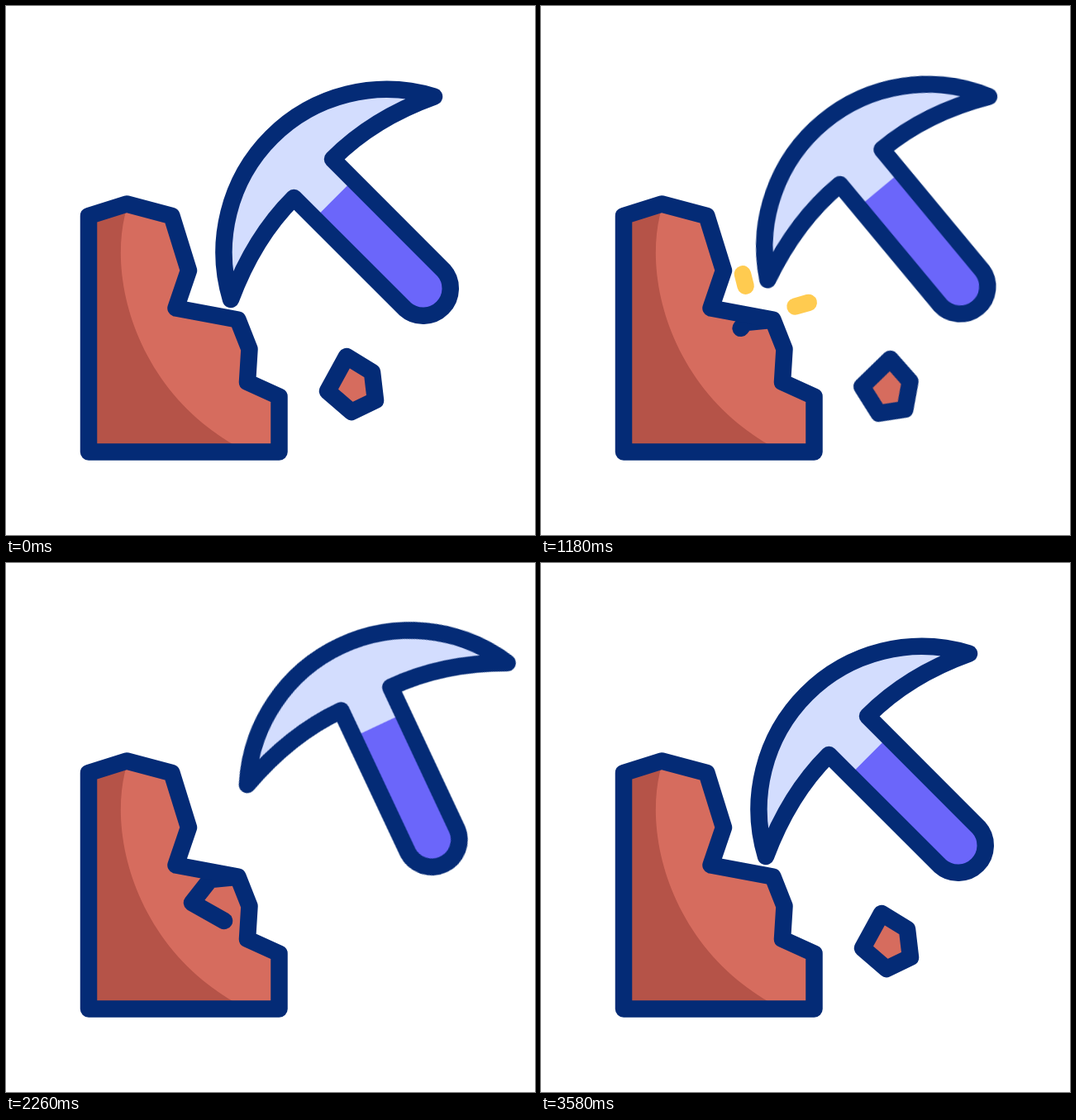
Write an HTML page that moves like this. It is 640 px wide and 640 px high and loops after 3.6 s.

```html
<!DOCTYPE html>
<html lang="en">
<head>
<meta charset="utf-8">
<title>Mining</title>
<style>
  html, body { margin: 0; width: 100%; height: 100%; overflow: hidden; background: #fff; }
  svg { display: block; width: 100vw; height: 100vh; overflow: hidden; }
  .line { fill: none; stroke: #042b76; stroke-width: 20.5; stroke-linecap: round; stroke-linejoin: round; }
  .rock { fill: #d66c5e; }
  .shade { fill: #b55348; }
  .steel { fill: #d3ddfe; }
  .grip { fill: #6b66fa; }

  #pick, #crack, #sparks, #sparks path, #flyX, #flyY, #spin { animation: 3600ms linear infinite; }

  /* three swings, 800 ms each */
  #pick { transform-origin: 530px 368.5px; animation-name: swing; }
  @keyframes swing {
    0% { transform: rotate(0deg); }
    5.556%, 27.778%, 50% { transform: rotate(0deg); animation-timing-function: cubic-bezier(.5, -.22, .6, 1); }
    16.667%, 38.889%, 61.111% { transform: rotate(20.6deg); animation-timing-function: cubic-bezier(.5, 0, .44, 1); }
    72.222%, 100% { transform: rotate(0deg); }
  }

  #crack { stroke-dasharray: 111 300; animation-name: split, showCrack; }
  @keyframes split {
    0%, 27.778% { stroke-dashoffset: 111; }
    35%, 50% { stroke-dashoffset: 54; }
    57.5%, 100% { stroke-dashoffset: 0; }
  }
  @keyframes showCrack {
    0% { opacity: 0; animation-timing-function: step-end; }
    27.778% { opacity: 1; animation-timing-function: step-end; }
    72.222%, 100% { opacity: 0; }
  }

  #sparks { fill: none; stroke: #ffcb50; stroke-width: 20.5; stroke-linecap: round; animation-name: flash; animation-timing-function: step-end; }
  #sparks path { animation-name: shoot; }
  @keyframes flash {
    0%, 40.278%, 62.5%, 84.722%, 100% { opacity: 0; }
    27.778%, 50%, 72.222% { opacity: 1; }
  }
  @keyframes shoot {
    0%, 27.778%, 50%, 72.222% { stroke-dasharray: 0 300; stroke-dashoffset: 0; }
    30.556%, 52.778%, 75% { stroke-dasharray: 34 300; stroke-dashoffset: 0; }
    36.111%, 58.333%, 80.556% { stroke-dasharray: 41 300; stroke-dashoffset: -59; }
    40%, 62.222%, 84.444%, 100% { stroke-dasharray: 0 300; stroke-dashoffset: -100; }
  }

  /* the loose stone drops away, then a new one breaks off */
  #flyX { animation-name: flyX; }
  #flyY { animation-name: flyY; }
  #spin { animation-name: spin; }
  @keyframes flyX {
    0%, 27.778% { transform: translateX(419px); }
    47.778%, 72.221% { transform: translateX(421px); }
    72.222% { transform: translateX(259px); animation-timing-function: cubic-bezier(.33, .09, .67, .53); }
    94.444%, 100% { transform: translateX(419px); }
  }
  @keyframes flyY {
    0% { transform: translateY(457px); }
    27.778% { transform: translateY(457px); animation-timing-function: cubic-bezier(.33, 0, .67, 0); }
    47.778%, 72.221% { transform: translateY(682px); }
    72.222% { transform: translateY(405px); animation-timing-function: cubic-bezier(.33, .6, .67, 1); }
    84.444% { transform: translateY(350px); animation-timing-function: cubic-bezier(.33, 0, .67, .4); }
    94.444%, 100% { transform: translateY(457px); }
  }
  @keyframes spin {
    0% { transform: rotate(0deg); }
    27.778% { transform: rotate(0deg); animation-timing-function: cubic-bezier(.33, 0, .67, .33); }
    47.778%, 72.221% { transform: rotate(270deg); }
    72.222% { transform: rotate(-90deg); animation-timing-function: cubic-bezier(.33, 0, .67, .26); }
    94.444%, 100% { transform: rotate(360deg); }
  }
</style>
</head>
<body>
<svg viewBox="0 0 640 640">
  <defs>
    <path id="cliff" d="M100 254L146 239.5L200.5 254L221 320L205.5 365.5L280.5 379.5L294.5 415L292 455L330.5 472.5V539.5H100Z"/>
    <path id="tool" d="M272 355A197 197 0 0 1 518 109.5Q444 136 395 185.3L529.3 319.7A33 33 0 0 1 482.7 366.3L348.3 232Q300 280 272 355Z"/>
    <path id="stone" d="M-7 -33L24 -14L28 20L-1 34L-30 9Z"/>
    <clipPath id="cliffClip"><use href="#cliff"/></clipPath>
  </defs>

  <use href="#cliff" class="rock"/>
  <path class="shade" clip-path="url(#cliffClip)" d="M146 245C121 330 160 470 285 536V550H90V230H150Z"/>
  <path id="crack" class="line" pathLength="111" d="M278 380L247 383L225 411L264 433"/>
  <use href="#cliff" class="line"/>

  <g id="flyX"><g id="flyY"><g id="spin">
    <use href="#stone" class="rock"/>
    <use href="#stone" class="line"/>
  </g></g></g>

  <g id="sparks">
    <path pathLength="100" d="M250 348L240 309"/>
    <path pathLength="100" d="M297 366.5L341 354"/>
  </g>

  <g id="pick">
    <use href="#tool" class="steel"/>
    <path class="grip" d="M373.3 257L420 210.3L529.3 319.7A33 33 0 0 1 482.7 366.3Z"/>
    <use href="#tool" class="line"/>
  </g>
</svg>
</body>
</html>
```
